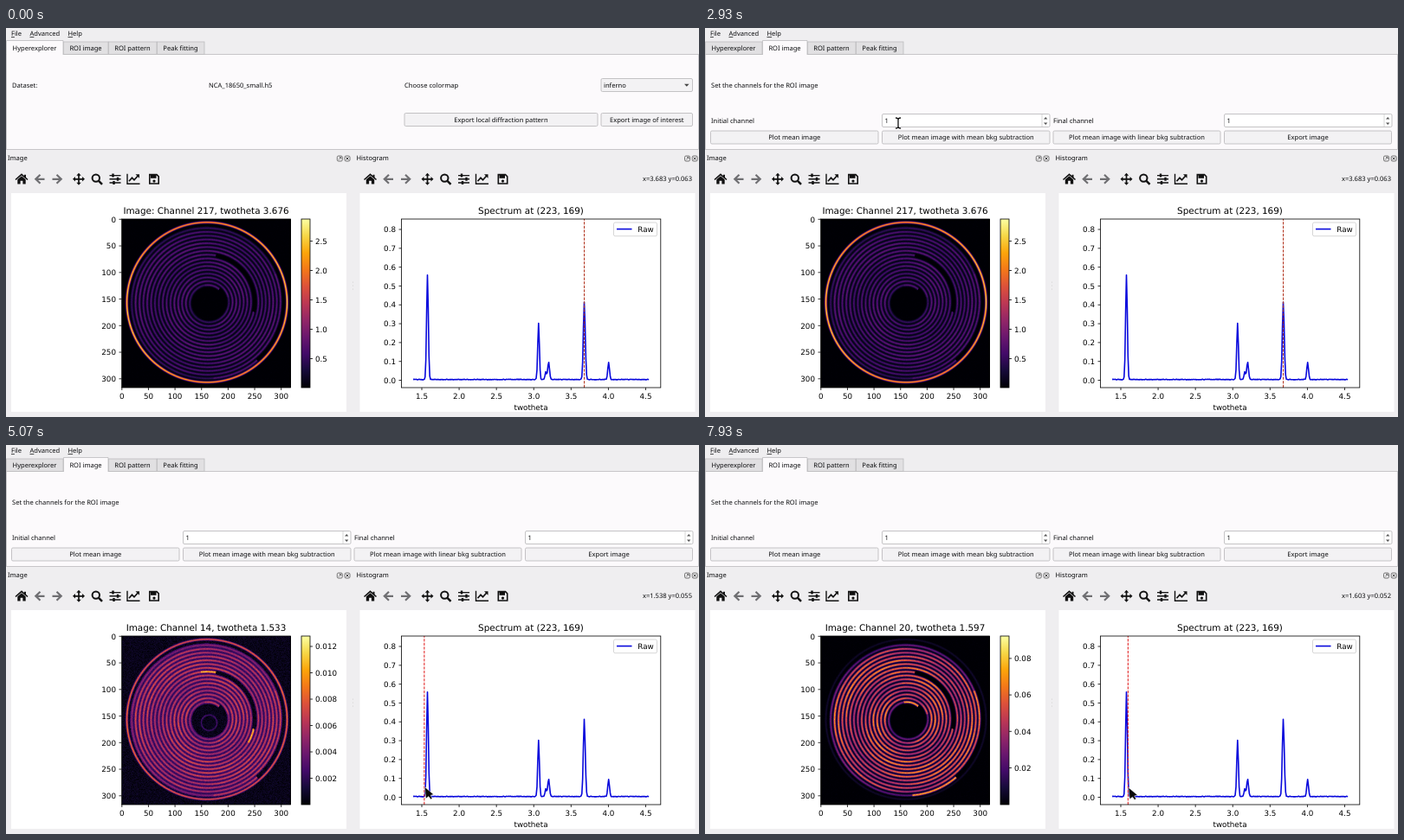
Recreate the animation shown at these times as an HTML page with a canvas. Size 800 by 450 pixels, loop 8 s.

```html
<!DOCTYPE html>
<html lang="en">
<head>
<meta charset="utf-8">
<title>Diffraction explorer</title>
<style>
html, body { margin: 0; width: 100%; height: 100%; overflow: hidden; background: #efeef0; }
svg, canvas { position: absolute; left: 0; top: 0; }
canvas { left: 133.5px; top: 221px; width: 195px; height: 195px; }
text { font-family: "Noto Sans", sans-serif; font-size: 7.55px; fill: #0c0d0f; text-rendering: geometricPrecision; white-space: pre; }
.plot text { font-family: "DejaVu Sans", sans-serif; font-size: 8.75px; fill: #000; }
.plot .title { font-size: 10.4px; }
</style>
</head>
<body>
<svg id="ui" width="800" height="450"></svg>
<canvas id="map" width="320" height="317"></canvas>
<svg id="top" width="800" height="450">
  <rect x="133.5" y="221" width="195" height="195" fill="none" stroke="#000" stroke-width=".8"/>
  <g id="arrow"><path d="M0 0L1.4 13.6L4.6 11L7 14.4L8.8 13.2L6.8 9.8L10.4 8.8Z" fill="#0a0a0a" stroke="#fff" stroke-width=".5" stroke-linejoin="round"/></g>
  <g id="beam"><path d="M-3-6Q0-6 0-4Q0-6 3-6M0-5V5M-3 6Q0 6 0 4Q0 6 3 6" fill="none" stroke="#fff" stroke-width="2.6"/><path d="M-3-6Q0-6 0-4Q0-6 3-6M0-5V5M-3 6Q0 6 0 4Q0 6 3 6" fill="none" stroke="#111" stroke-width="1.3"/></g>
  <g id="busy"><circle r="5.6" fill="#333" stroke="#999" stroke-width=".8"/><g id="wheel" fill="none" stroke-width="2.2"><path d="M-3.6 0A3.6 3.6 0 0 1 0-3.6" stroke="#b9b9b9"/><path d="M0-3.6A3.6 3.6 0 0 1 3.6 0" stroke="#d98a3c"/><path d="M3.6 0A3.6 3.6 0 0 1 0 3.6" stroke="#111"/><path d="M0 3.6A3.6 3.6 0 0 1-3.6 0" stroke="#6d7f99"/></g></g>
</svg>
<script>
const $ = id => document.getElementById(id);
const LOOP = 8000;
const range = (n, f) => Array.from({ length: n }, (_, i) => f(i));
const many = (n, f) => range(n, f).join('');

// Spectrum axes: data to stage
const X = v => 480 + (v - 1.5) * 86.17;
const Y = v => 407.5 - v * 218.1;
const theta = channel => 1.3855 + channel * 0.010557;

// Drawing helpers
const text = (x, y, s, attrs = '') => `<text x="${x}" y="${y}" ${attrs}>${s}</text>`;
const MID = 'text-anchor="middle"', END = 'text-anchor="end"';
const box = (x, y, w, h, fill, stroke = 'none', r = 0) =>
  `<rect x="${x}" y="${y}" width="${w}" height="${h}" rx="${r}" fill="${fill}" stroke="${stroke}" stroke-width=".8"/>`;
const path = (d, stroke = '#000', w = 0.8, fill = 'none') =>
  `<path d="${d}" stroke="${stroke}" stroke-width="${w}" fill="${fill}"/>`;
const button = (x, y, w, label) =>
  box(x, y, w, 15, '#f3f2f4', '#b6b5b8', 1.5) + text(x + w / 2, y + 10.3, label, MID);
const spin = x => box(x, 99.5, 193.5, 15, '#fff', '#b6b5b8', 1.5) + text(x + 3, 109.7, '1') +
  path(`M${x + 184.5} 100V114`, '#ccc') +
  path(`M${x + 186.5} 105.5l2.2-2.4 2.2 2.4zM${x + 186.5} 109.5l2.2 2.4 2.2-2.4z`, 'none', 0, '#555');

const TABS = [['Hyperexplorer', 0, 66], ['ROI image', 66, 118], ['ROI pattern', 118, 174], ['Peak fitting', 174, 229]];

function tabBar(active) {
  return TABS.map(([label, a, b], i) => {
    const on = i === active, y = on ? 14.5 : 16;
    return box(a + .5, y, b - a - .5, 31 - y - (on ? 0 : .5), on ? '#fcfafc' : '#e1e0e2', on ? 'none' : '#bcbbbe') +
      (on ? path(`M${a + .5} 31V${y}H${b}V31`, '#bcbbbe') : '') +
      text((a + b) / 2, 26, label, MID);
  }).join('');
}

const PAGES = [
  text(7, 68.7, 'Dataset:') + text(234, 68.7, 'NCA_18650_small.h5') + text(460, 68.7, 'Choose colormap') +
    box(687, 58.5, 105.5, 15, '#f3f2f4', '#b6b5b8', 1.5) + text(690, 68.7, 'inferno') +
    path('M783 64.8h5.6l-2.8 3z', 'none', 0, '#444') +
    button(460, 98.5, 223, 'Export local diffraction pattern') + button(687, 98.5, 105.5, 'Export image of interest'),
  text(7, 69, 'Set the channels for the ROI image') +
    text(7, 109.7, 'Initial channel') + spin(204.5) + text(402, 109.7, 'Final channel') + spin(599.5) +
    button(6.5, 119, 193.5, 'Plot mean image') +
    button(204.5, 119, 193.5, 'Plot mean image with mean bkg subtraction') +
    button(402, 119, 193, 'Plot mean image with linear bkg subtraction') +
    button(599.5, 119, 193, 'Export image')
];

function dock(x, title, right) {
  const at = (dx, s) => `<g transform="translate(${x + dx} 174.8)">${s}</g>`;
  const back = path('M5.5 0H-4M.5-5L-4.7 0L.5 5', '#6f6f72', 2.2);
  const ink = '#111';
  return text(x + 2, 153.2, title) +
    box(right - 15, 148, 6, 6, 'none', '#555', 1.5) + path(`M${right - 13.5} 152.5l3-3m-2 0h2v2`, '#555') +
    box(right - 6.3, 148, 6, 6, 'none', '#555', 1.5) + path(`M${right - 4.8} 149.5l3 3m0-3l-3 3`, '#444', 1) +
    at(18, path('M-7 .7L0-5.5L7 .7', ink, 1.6) + path('M-4.7 .5L0-3.6L4.7 .5V5.6H1.4V2H-1.4V5.6H-4.7ZM3-5H5V-1L3-3Z', 'none', 0, ink)) +
    at(39, back) + at(59, `<g transform="scale(-1 1)">${back}</g>`) +
    at(84, path('M-5 0H5M0-5V5', ink, 1.7) + path('M0-7l2.7 3h-5.4zM0 7l2.7-3h-5.4zM-7 0l3-2.7v5.4zM7 0l-3-2.7v5.4z', 'none', 0, ink)) +
    at(105, `<circle cx="-1.2" cy="-1.2" r="4.2" fill="none" stroke="${ink}" stroke-width="2"/>` + path('M2 2L6 6', ink, 2.5)) +
    at(126, path('M-6.5-4.2H6.5M-6.5 0H6.5M-6.5 4.2H6.5', ink, 1.4) + path('M-2.5-6.2v4M3-2v4M-1.5 2.2v4', ink, 2.4)) +
    at(147, path('M-7-6V5.5H7.5', ink, 1.4) + path('M-5 2.5L-1.5-1.5L1 1L5.5-4', ink, 1.7) + path('M2.5-5.5H7V-1z', 'none', 0, ink)) +
    at(171, path('M-5.2-5.2H3L5.2-3V5.2H-5.2Z', ink, 1.6) + path('M-4-5H2.5V-1H-4Z', 'none', 0, ink) + `<circle cy="2.3" r="1.6" fill="${ink}"/>`) +
    box(x + 6, 191, 387, 253, '#fff');
}

// Peaks: centre, height, width
const PEAKS = [[1.576, .556, .0118], [3.064, .298, .0112], [3.16, .04, .01], [3.199, .092, .0125], [3.677, .41, .0128], [4.003, .092, .0112]];
const level = v => PEAKS.reduce((s, [c, h, w]) => s + h * Math.exp(-(((v - c) / w) ** 2) / 2), .004);
const curve = 'M' + range(300, i =>
  `${X(theta(i)).toFixed(1)} ${Y(level(theta(i)) + .0012 * Math.sin(i * i * 1.7)).toFixed(1)}`).join('L');
const BLUE = '#0808dc';

const plots = `<g class="plot">` +
  many(7, i => { const x = 133.8 + i * 30.65, y = 221.3 + i * 30.75;
    return path(`M${x} 416v3M133.5 ${y}h-3`) + text(x, 429.3, i * 50, MID) + text(127, y + 3.2, i * 50, END); }) +
  many(7, i => { const x = X(1.5 + i / 2);
    return path(`M${x} 416v3`) + text(x, 429.3, (1.5 + i / 2).toFixed(1), MID); }) +
  many(9, i => path(`M456.5 ${Y(i / 10)}h-3`) + text(450, Y(i / 10) + 3.2, (i / 10).toFixed(1), END)) +
  text(606, 441.5, 'twotheta', MID) + text(606, 215.3, 'Spectrum at (223, 169)', 'text-anchor="middle" class="title"') +
  `<g stroke-linejoin="round">${path(curve, BLUE, 1.6)}</g>` +
  `<path id="marker" stroke-width="1" stroke-dasharray="3.2 1.4"/>` +
  box(456.5, 221, 299.3, 195, 'none', '#000') +
  box(701.5, 225, 50, 15.7, '#fff', '#ccc', 1.7) + path('M705 232.6h17.5', BLUE, 1.6) + text(729.3, 235.8, 'Raw') +
  `<text id="mapTitle" class="title" x="231" y="215.3" ${MID}></text><g id="barTicks"></g>` +
  box(341, 221, 10, 195, 'url(#inferno)', '#000') + '</g>';

const INFERNO = '000004 160b39 420a68 6a176e 932667 bc3754 dd513a f37819 fca50a f6d746 fcffa4'.split(' ');
const RGB = INFERNO.map(h => [0, 2, 4].map(i => parseInt(h.slice(i, i + 2), 16)));

$('ui').innerHTML =
  `<defs><linearGradient id="inferno" x1="0" y1="1" x2="0" y2="0">${INFERNO.map((c, i) => `<stop offset="${i / 10}" stop-color="#${c}"/>`).join('')}</linearGradient></defs>` +
  box(0, 0, 800, 450, '#efeef0') +
  [['File', 6], ['Advanced', 27.5], ['Help', 71.5]].map(([s, x]) =>
    text(x, 9.3, `<tspan text-decoration="underline">${s[0]}</tspan>${s.slice(1)}`)).join('') +
  box(.5, 30.5, 799, 110, '#fcfafc', '#bcbbbe') +
  PAGES.map((page, i) => `<g id="page${i}">${tabBar(i)}${page}</g>`).join('') +
  dock(0, 'Image', 397.3) + dock(402.5, 'Histogram', 798.5) +
  many(3, i => `<circle cx="400.5" cy="${294 + i * 4}" r=".6" fill="#ccc"/>`) +
  `<text id="coords" x="792" y="177.3" ${END}></text>` + plots;

// One entry per selected channel; ticks: count, first value, lowest y, spacing, decimals
const VIEWS = [
  { at: 0, channel: 217, color: '#b0301a', ticks: [5, .5, 382.5, 34, 1], bg: 0, noise: .015, fill: .02, line: .22, vary: .15, ring: .84, core: 0, ends: 0, tips: 0 },
  { at: 4130, channel: 14, color: '#e01818', ticks: [6, .002, 385.5, 30.5, 3], bg: .04, noise: .09, fill: .1, line: .38, vary: .18, ring: .6, core: .16, ends: .36, tips: 0 },
  { at: 5870, channel: 10, color: '#96281a', ticks: [5, .002, 381, 34.6, 3], bg: .04, noise: .13, fill: .13, line: .17, vary: .1, ring: .68, core: .14, ends: 0, tips: 0 },
  { at: 6870, channel: 19, color: '#96341a', ticks: [5, .1, 378.5, 37.5, 1], bg: 0, noise: .02, fill: 0, line: .76, vary: .13, ring: 0, core: 0, ends: 0, tips: .1 },
  { at: 7660, channel: 20, color: '#e01818', ticks: [4, .02, 373.5, 42.2, 2], bg: 0, noise: .02, fill: .01, line: .62, vary: .26, ring: .07, core: 0, ends: 0, tips: .2 }
];

// Wound cell: a spiral of 15.7 turns inside a round can, with one stretch missing
const PITCH = 4.36, INNER = 20, TURNS = 15.72, GAP = [7.825, 8.08];
const hash = (x, y) => { const s = Math.sin(x * 12.9898 + y * 78.233) * 43758.5453; return s - Math.floor(s); };
const bell = (d, w) => Math.exp(-((d / w) ** 2));

// Brightness along the winding: glowing ends, dimmer first and last turn
function strength(turn, phi, v) {
  if (turn > GAP[0] - .05 && turn < GAP[1] + .05) return v.line + v.ends;
  if (turn < .14 || turn > TURNS - .1) return v.line + v.tips;
  const wave = Math.sin(phi * 2 + turn * .55) * .6 + Math.sin(phi * 5 - turn * 1.9) * .4;
  const edge = turn < .9 || turn > TURNS - .8 ? 1 - v.vary * 2 : 1;
  return v.line * (1 + v.vary * wave) * edge;
}

function shade(px, py, v) {
  const sx = px * .6094 - 97.7, sy = py * .6151 - 96;
  const can = Math.hypot(sx, sy), shift = 1 - can / 90;
  const dx = sx - 2.2 * shift, dy = sy - .6 * shift;
  const r = Math.hypot(dx, dy), phi = Math.atan2(dy, dx);
  const u = ((-.9 - phi) / (2 * Math.PI) + 2) % 1;
  const n = (r - INNER) / PITCH - u, k = Math.round(n), turn = k + u;
  const gap = turn > GAP[0] && turn < GAP[1];
  let value = v.bg + (hash(px, py) - .5) * v.noise + v.ring * bell(can - 92.5, 1.15) * (1 + .08 * Math.sin(phi * 2 + 2));
  value += v.core * bell(Math.hypot(sx - 2.5, sy - 4) - 9, .9);
  if (turn >= 0 && turn <= TURNS && !gap) {
    const grain = 1 + (hash(px + 7, py + 3) - .5) * .25;
    value += v.fill + strength(turn, phi, v) * grain * bell((n - k) * PITCH, 1.2);
  }
  return Math.min(1, Math.max(0, value));
}

const ctx = $('map').getContext('2d');
function renderMap(view) {
  const img = ctx.createImageData(320, 317);
  for (let i = 0; i < 320 * 317; i++) {
    const s = shade(i % 320, Math.floor(i / 320), view) * 9.999, j = Math.floor(s), f = s - j;
    for (let c = 0; c < 3; c++) img.data[i * 4 + c] = RGB[j][c] + (RGB[j + 1][c] - RGB[j][c]) * f;
    img.data[i * 4 + 3] = 255;
  }
  return img;
}
for (const view of VIEWS) view.image = renderMap(view);

let shown;
function show(view) {
  if (view === shown) return;
  shown = view;
  const v = theta(view.channel), [count, first, low, step, digits] = view.ticks;
  ctx.putImageData(view.image, 0, 0);
  $('mapTitle').textContent = `Image: Channel ${view.channel}, twotheta ${v.toFixed(3)}`;
  $('barTicks').innerHTML = many(count, i => path(`M351 ${low - i * step}h3`) +
    text(357, low - i * step + 3.2, (first * (i + 1)).toFixed(digits)));
  $('marker').setAttribute('d', `M${X(v)} 416V221`);
  $('marker').setAttribute('stroke', view.color);
}

// Pointer path: time, x, y
const MOVES = [
  [330, X(3.683), Y(.063)], [930, 160.5, 43], [1000, 158, 42], [1400, 93, 22], [1700, 93, 22],
  [2550, 223, 110], [2950, 223, 110], [3600, 505, 345], [3950, X(1.538), Y(.055)], [5400, X(1.538), Y(.055)],
  [5800, X(1.494), Y(.052)], [6400, X(1.494), Y(.052)], [6780, X(1.589), Y(.052)], [7350, X(1.589), Y(.052)],
  [7580, X(1.603), Y(.052)], [LOOP, X(1.603), Y(.052)]
];

function pointer(t) {
  const i = Math.max(1, MOVES.findIndex(m => m[0] > t));
  const [a, b] = [MOVES[i - 1], MOVES[i]];
  const p = Math.min(1, Math.max(0, (t - a[0]) / (b[0] - a[0])));
  const e = p * p * (3 - 2 * p);
  return [a[1] + (b[1] - a[1]) * e, a[2] + (b[2] - a[2]) * e];
}

function frame() {
  const t = performance.now() % LOOP;
  const page = t < 1470 ? 0 : 1;
  PAGES.forEach((_, i) => $('page' + i).style.display = i === page ? '' : 'none');
  show(VIEWS.filter(v => v.at <= t).pop());

  const [x, y] = pointer(t);
  const inField = page === 1 && x > 204 && x < 389 && y > 99 && y < 115;
  const kind = t < 330 ? '' : t > 5870 && t < 6200 ? 'busy' : inField ? 'beam' : 'arrow';
  for (const id of ['arrow', 'beam', 'busy']) {
    $(id).style.display = id === kind ? '' : 'none';
    $(id).setAttribute('transform', `translate(${x} ${y})`);
  }
  $('wheel').setAttribute('transform', `rotate(${t * .4})`);

  const inAxes = t > 2950 && x > 456.5 && y > 221;
  $('coords').textContent = inAxes
    ? `x=${(1.5 + (x - 480) / 86.17).toFixed(3)} y=${((407.5 - y) / 218.1).toFixed(3)}`
    : 'x=3.683 y=0.063';
  requestAnimationFrame(frame);
}
frame();
</script>
</body>
</html>
```
